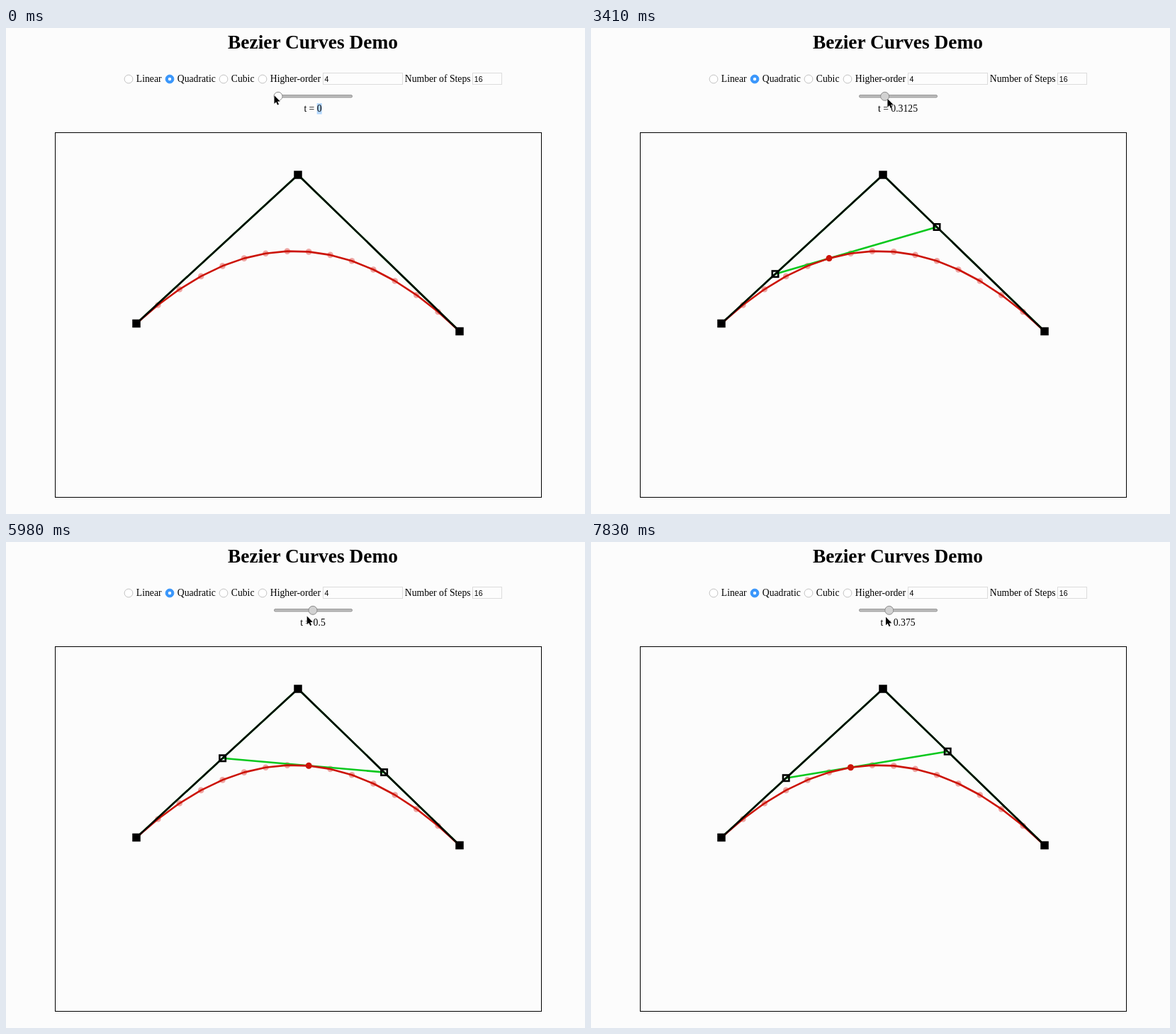
An HTML page that plays this animation: 817 by 685 pixels, repeating every 8000 ms.

```html
<!DOCTYPE html>
<html lang="en">
<head>
<meta charset="utf-8">
<title>Bezier Curves Demo</title>
<style>
  html, body { margin: 0; width: 100%; height: 100%; overflow: hidden; background: #fcfcfc; }
  svg { display: block; width: 817px; height: 685px; }
  text { font: 13.7px "Liberation Serif", Times, serif; }
  .title { font-size: 27.4px; font-weight: bold; }
  .value { font: 10.6px "Liberation Sans", Arial, sans-serif; }
  .mid { text-anchor: middle; }
  .field { fill: #fdfdfd; stroke: #dcdcdc; }
  .radio { fill: #fff; stroke: #c4c4c4; }
  .radio.on { fill: #3b97fb; stroke: #3b97fb; }
  .line { fill: none; stroke-width: 2.6; stroke-linejoin: round; }
  .open { fill: none; stroke: #000; stroke-width: 2.6; }
</style>
</head>
<body>
<svg viewBox="0 0 817 685">
  <text class="title mid" x="433" y="29">Bezier Curves Demo</text>
  <g id="radios"></g>
  <text x="562.8" y="76">Number of Steps</text>
  <rect class="field" x="447.5" y="63.5" width="112" height="16"/>
  <rect class="field" x="658.5" y="63.5" width="41" height="16"/>
  <text class="value" x="449.5" y="75.5">4</text>
  <text class="value" x="660.8" y="75.5">16</text>

  <rect x="378.5" y="94.5" width="110" height="3.4" rx="1.5" fill="#bdbdbd" stroke="#949494"/>
  <circle id="thumb" cy="96.3" r="6" stroke="#8c8c8c"/>
  <rect id="mark" x="438.7" y="106" width="7" height="15.5" fill="#b3d7fe"/>
  <text id="label" class="mid" x="433" y="118"></text>

  <rect x="69.5" y="147.5" width="686" height="514" fill="none" stroke="#000"/>
  <g id="dots" fill="#eea5a3"></g>
  <path id="glow" class="line" stroke="#0bc81e"/>
  <path id="span" class="line" stroke="#0bc81e"/>
  <path id="curve" class="line" stroke="#cc1408"/>
  <circle id="dot" r="4.5" fill="#cc1408"/>
  <path id="hull" class="line" stroke="#000"/>
  <g id="ends"></g>
  <rect id="openA" class="open" width="8.4" height="8.4"/>
  <rect id="openB" class="open" width="8.4" height="8.4"/>

  <path id="cursor" d="M0 0V11.7L2.7 9.2L4.6 13.4L6.5 12.5L4.6 8.5H8.3Z"
        fill="#000" stroke="#fff" paint-order="stroke"/>
</svg>
<script>
const LOOP = 8000, STEP = 90, LAST = 15;
const P = [[184, 416.5], [412, 207], [640, 427.5]];

const $ = id => document.getElementById(id);
const mix = (a, b, u) => a + (b - a) * u;
const between = (p, q, u) => p.map((v, i) => mix(v, q[i], u));
const toPath = points => 'M' + points.join('L');

// The hand's strokes: start, end, then cursor x, y and slider step reached
const rest = [378.5, 95, 0];
const strokes = [
  [90, 670, 366, 111, 0],
  [840, 1370, 389, 95.5, 0],
  [2360, 3960, 461, 106, 12],
  [4140, 4590, 469, 109, 15],
  [4950, 5600, 434, 105, 9],
  [5710, 6160, 413, 104, 6],
  [6540, 6860, 434, 105, 9],
  [7030, 7210, 421, 105, 7],
  [7480, 7830, 413.5, 106, 5]
];

// Every stroke speeds up and is seen in steps
function handAt(time) {
  let pose = rest;
  for (const [start, end, ...to] of strokes) {
    if (time < start) break;
    const ticks = Math.floor((time - start) / STEP) + 1;
    const u = Math.min(1, ticks * STEP / (end - start + STEP));
    pose = between(pose, to, u * u);
  }
  return pose;
}

// The two inner points on the hull and the curve point between them
function casteljau(u) {
  const a = between(P[0], P[1], u), b = between(P[1], P[2], u);
  return [a, b, between(a, b, u)];
}

function set(el, attrs) {
  for (const key in attrs) el.setAttribute(key, attrs[key]);
}
function add(id, tag, attrs, text = '') {
  const el = document.createElementNS('http://www.w3.org/2000/svg', tag);
  set(el, attrs);
  el.textContent = text;
  $(id).append(el);
}
function square([x, y], size) {
  return { x: x - size / 2, y: y - size / 2, width: size, height: size };
}

const options = { Linear: 173, Quadratic: 231, Cubic: 307, 'Higher-order': 362 };
for (const [name, cx] of Object.entries(options)) {
  const on = name === 'Quadratic';
  add('radios', 'circle', { class: on ? 'radio on' : 'radio', cx, cy: 72, r: 5.9 });
  if (on) add('radios', 'circle', { cx, cy: 72, r: 2.2, fill: '#fff' });
  add('radios', 'text', { x: cx + 10.8, y: 76 }, name);
}

const samples = Array.from({ length: LAST + 1 }, (_, i) => casteljau(i / LAST)[2]);
samples.slice(1, -1).forEach(([cx, cy]) => add('dots', 'circle', { cx, cy, r: 4.3 }));
P.forEach(p => add('ends', 'rect', square(p, 11.5)));
set($('curve'), { d: toPath(samples) });
for (const id of ['hull', 'glow']) set($(id), { d: toPath(P) });

function draw(time) {
  const [x, y, value] = handAt(time);
  const k = Math.round(value);
  const [a, b, c] = casteljau(k / LAST);

  set($('cursor'), { transform: `translate(${x} ${y})` });
  set($('thumb'), { cx: 384 + 98 * k / 16, fill: time < 2090 ? '#fff' : '#d2d2d2' });
  $('label').textContent = 't = ' + k / 16;
  $('mark').style.display = time < 1020 ? '' : 'none';

  set($('span'), { d: toPath([a, b]) });
  set($('dot'), { cx: c[0], cy: c[1] });
  set($('openA'), square(a, 8.4));
  set($('openB'), square(b, 8.4));
  const inside = k > 0 && k < LAST;
  for (const id of ['span', 'dot', 'openA', 'openB']) $(id).style.display = inside ? '' : 'none';
}

const began = performance.now();
function tick() {
  draw((performance.now() - began) % LOOP);
  requestAnimationFrame(tick);
}
tick();
</script>
</body>
</html>
```
